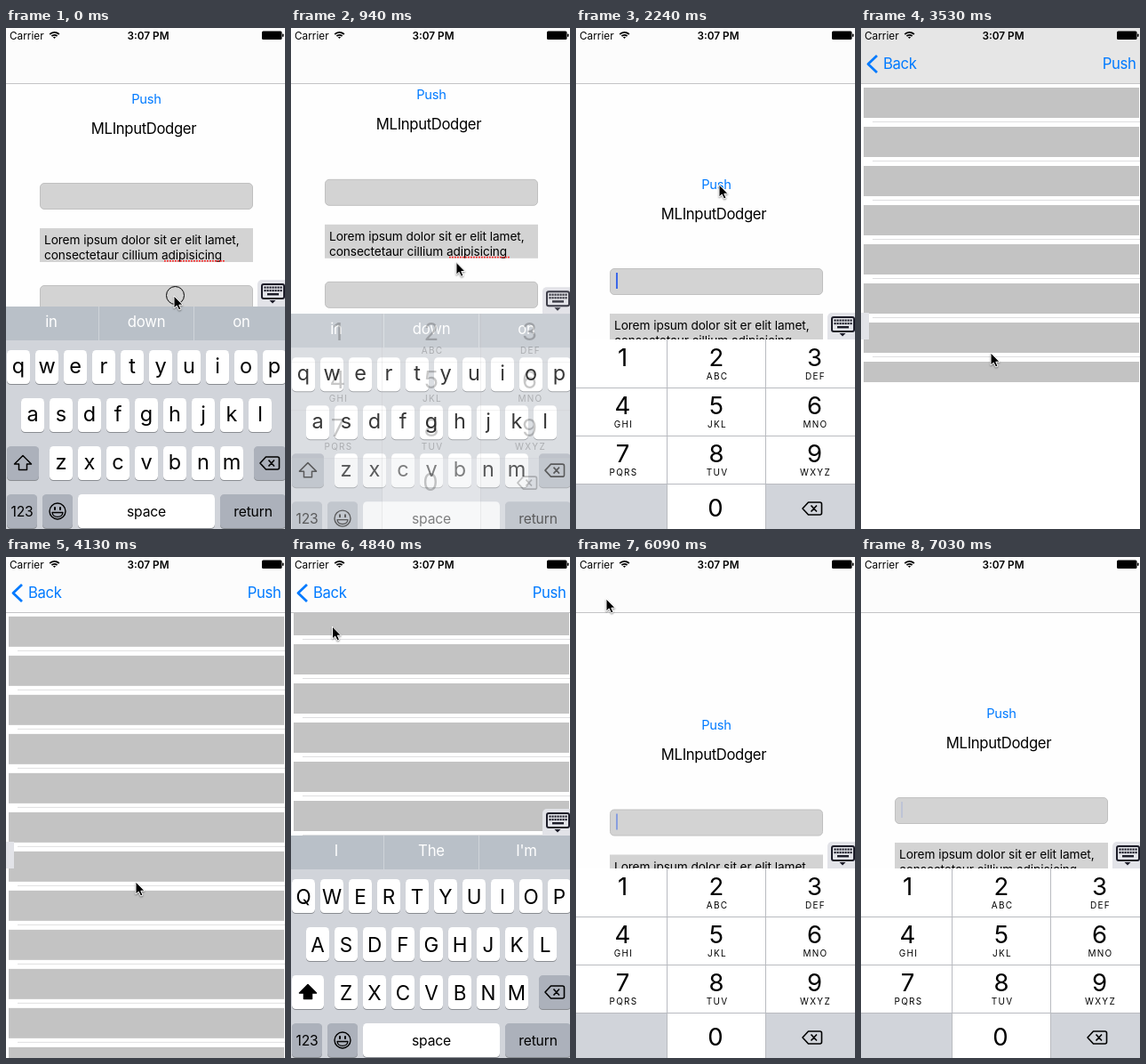
Animation of 314x563 px, one loop 7.26 s. Source, as an HTML page with a canvas:

```html
<!DOCTYPE html>
<html lang="en">
<head>
<meta charset="utf-8">
<title>Input dodging demo</title>
<style>
  html, body { margin: 0; width: 100%; height: 100%; overflow: hidden; background: #fff; }
  canvas { display: block; width: 314px; height: 563px; }
</style>
</head>
<body>
<canvas id="stage"></canvas>
<script>
const W = 314, H = 563, LOOP = 7260, LAST_CHANGE = 7030;
const BLUE = '#007aff', CARET = '#3b67e8', KEYBOARD = '#d1d4da';
const LETTERS_TOP = 313, NUMPAD_TOP = 350, ROW = 54, COLUMN = 32, CELL = 44;

// Starts of the main events, in ms.
const SWAP = 850, FOCUS_FIRST = 1640, PUSH = 2560, SETTLE = 3600, TYPE = 4120, POP = 5410, DODGE = 6140;
const TAPS = [-90, 1500, 2300, 3850, 5140];
const TAP_LENGTH = 120;

const canvas = document.getElementById('stage');
const ratio = window.devicePixelRatio || 1;
canvas.width = W * ratio;
canvas.height = H * ratio;
const ctx = canvas.getContext('2d');

const clamp = v => Math.min(1, Math.max(0, v));

// Eased progress from 0 to 1.
function ramp(t, start, length) {
  const p = clamp((t - start) / length);
  return p * p * (3 - 2 * p);
}

function rect(x, y, w, h, color) {
  ctx.fillStyle = color;
  ctx.fillRect(x, y, w, h);
}

function paint(fill, stroke, width) {
  if (fill) { ctx.fillStyle = fill; ctx.fill(); }
  if (stroke) { ctx.strokeStyle = stroke; ctx.lineWidth = width; ctx.stroke(); }
}

function rounded(x, y, w, h, r, fill, stroke, width = 1) {
  ctx.beginPath();
  ctx.roundRect(x, y, w, h, r);
  paint(fill, stroke, width);
}

function arc(x, y, r, from, to, fill, stroke, width = 1) {
  ctx.beginPath();
  ctx.arc(x, y, r, from * Math.PI, to * Math.PI);
  paint(fill, stroke, width);
}

function shape(path, fill, stroke, width = 1.5) {
  const outline = new Path2D(path);
  ctx.lineJoin = 'round';
  if (fill) { ctx.fillStyle = fill; ctx.fill(outline); }
  if (stroke) { ctx.strokeStyle = stroke; ctx.lineWidth = width; ctx.stroke(outline); }
}

function text(string, x, y, size, { color = '#000', align = 'center', spacing = 0, weight = 400 } = {}) {
  ctx.font = `${weight} ${size}px Inter, "Open Sans", sans-serif`;
  ctx.letterSpacing = spacing + 'px';
  ctx.textAlign = align;
  ctx.fillStyle = color;
  ctx.fillText(string, x, y);
}

function at(x, y, draw) {
  ctx.save();
  ctx.translate(x, y);
  draw();
  ctx.restore();
}

function caret(t, x, y, peak) {
  ctx.globalAlpha = clamp(.5 + 1.8 * Math.cos((t - peak) / 910 * 2 * Math.PI));
  rect(x, y, 2, 18, CARET);
}

function drawForm(t) {
  const rise = t < SETTLE
    ? 115 * ramp(t, FOCUS_FIRST, 360) - 19 * ramp(t, SWAP, 300)
    : 109.5 - 13.5 * ramp(t, DODGE, 310);
  rect(0, 0, W, H, '#fefefe');
  at(0, rise, () => {
    text('Push', 158, 84.5, 14.7, { color: BLUE, spacing: -.2 });
    text('MLInputDodger', 155, 118.5, 16.7, { spacing: -.35 });
    for (const y of [174.5, 289.5]) rounded(38.5, y, 239, 29, 4.5, '#d3d3d3', '#c0c0c0');
    rect(38, 225, 240, 38, '#d3d3d3');
    const body = { align: 'left', spacing: -.09 };
    text('Lorem ipsum dolor sit er elit lamet,', 43, 243, 13.7, body);
    text('consectetaur cillium adipisicing', 43, 260, 13.7, body);
    for (let x = 178; x < 245; x += 3) rect(x, 261, 1.8, 1.6, '#f22');
    if (t < SWAP) caret(t, 185, 229, 507);
    else if (t < FOCUS_FIRST) caret(t, 45, 294, 1235);
    else caret(t, 45, 179, 403);
  });
}

function drawTable(t) {
  const scroll = 57 * ramp(t, TYPE, 360);
  rect(0, 0, W, H, '#fff');
  for (let y = 67 - scroll; y < H; y += CELL) {
    rect(3, y, 310, 34, '#c3c3c3');
    rect(13, y + 38, W, 1, '#dedee0');
  }
  if (t < SETTLE) rect(0, 398, W, H, '#fff');
}

function drawBackspace(x, y) {
  at(x, y, () => shape('M-11 0L-4.5-7H8.5Q10.5-7 10.5-5V5Q10.5 7 8.5 7H-4.5ZM-1.5-3.5L5 3.5M5-3.5L-1.5 3.5', null, '#000', 1.6));
}

function drawDismiss() {
  rounded(283, -30, 40, 30, [5, 0, 0, 0], '#e2e3e8');
  rounded(288, -25, 25, 16, 2, null, '#1c1c28', 2);
  for (let i = 0; i < 14; i++)
    rect(290.5 + i % 7 * 3, i < 7 ? -22.5 : -19, 2.1, 2.2, '#1c1c28');
  rect(294, -15, 13, 2.4, '#1c1c28');
  at(300, -7, () => shape('M-3.5 0H3.5L0 3.5Z', '#1c1c28'));
}

function drawKey(x, y, w, dark) {
  rounded(x, y + 1, w, 38, 4.5, '#898c91');
  rounded(x, y, w, 38, 4.5, dark ? '#acb1bb' : '#fff');
}

function drawWordKey(word, x, w, dark) {
  drawKey(x, 211, w, dark);
  text(word, x + w / 2, 235.5, 15.7, { spacing: -.2 });
}

function drawSmile(x, y) {
  at(x, y, () => {
    arc(0, 0, 9, 0, 2, null, '#000', 1.4);
    shape('M-6 1.5H6C5 8 -5 8 -6 1.5Z', null, '#000', 1.3);
    for (const side of [-3, 3]) rounded(side - 1, -5, 2, 4, 1, '#000');
  });
}

function drawLetters(upper) {
  drawDismiss();
  rect(0, 0, W, 250, KEYBOARD);
  rect(0, 0, W, 38, '#b9c0c8');
  (upper ? ['I', 'The', 'I\'m'] : ['in', 'down', 'on']).forEach((word, i) => {
    text(word, 51 + i * 107, 23, 16.7, { color: '#fff', spacing: -.2 });
    if (i) rect(i * 107 - 3, 0, 1, 38, '#cfd4d9');
  });

  ['qwertyuiop', 'asdfghjkl', 'zxcvbnm'].forEach((letters, row) => {
    const left = 158 - (letters.length * COLUMN - 6) / 2;
    [...letters].forEach((letter, i) => {
      const x = left + i * COLUMN, y = 49 + row * ROW;
      drawKey(x, y, 26);
      text(upper ? letter.toUpperCase() : letter, x + 13, y + (upper ? 27.5 : 26), upper ? 22.5 : 23.5);
    });
  });

  drawKey(1, 157, 36, !upper);
  at(19, 176, () => shape('M0-8.5L9.5 1H4.5V7.5H-4.5V1H-9.5Z', upper && '#000', '#000'));
  drawKey(279, 157, 36, true);
  drawBackspace(297, 176);

  drawWordKey('123', 1, 34, true);
  drawWordKey('', 41, 34, true);
  drawSmile(58, 230);
  drawWordKey('space', 81, 154);
  drawWordKey('return', 241, 74, true);
}

function drawNumpad() {
  drawDismiss();
  rect(0, 0, W, 260, '#fff');
  rect(0, 3 * ROW, W, 100, KEYBOARD);
  rect(103, 3 * ROW, 110, 100, '#fff');
  ['', 'ABC', 'DEF', 'GHI', 'JKL', 'MNO', 'PQRS', 'TUV', 'WXYZ'].forEach((label, i) => {
    const x = 52.5 + i % 3 * 108 - (i % 3 === 1) * 2.5, y = Math.floor(i / 3) * ROW;
    text(i + 1, x, y + 29.5, 27.5);
    text(label, x + 1, y + 45, 10, { spacing: 1.3 });
  });
  text('0', 157, 199, 27.5);
  drawBackspace(266, 190);
  for (let i = 1; i <= 3; i++) rect(0, i * ROW, W, 1, '#b9bbc0');
  for (const x of [102, 213]) rect(x, 0, 1, 260, '#b9bbc0');
}

function drawKeyboards(t, page) {
  const swap = ramp(t, SWAP, 300);
  if (swap < 1) {
    at(0, LETTERS_TOP + (NUMPAD_TOP - LETTERS_TOP) * swap, () => {
      drawLetters(false);
      ctx.globalAlpha = swap;
      if (swap) drawNumpad();
    });
    return;
  }
  at(-W * page, NUMPAD_TOP, drawNumpad);
  if (t > TYPE) {
    const hidden = (1 - ramp(t, TYPE, 360)) * 282;
    at(W * (1 - page), LETTERS_TOP + hidden, () => drawLetters(true));
  }
}

function drawStatus() {
  text('Carrier', 4, 12.5, 11.8, { align: 'left' });
  text('3:07 PM', 160, 12.5, 11.8, { weight: 600 });
  for (let i = 0; i < 3; i++) arc(54.5, 12, 1.2 + i * 3, -.76, -.24, null, '#000', 1.8);
  rounded(288, 3.5, 22.5, 9.5, 1.5, '#000');
  rounded(311, 6.5, 1.5, 3.5, .7, '#000');
}

function drawBars(t, page) {
  const gray = 252 - 22 * (ramp(t, PUSH, 500) - ramp(t, SETTLE - 40, 60));
  rect(0, 0, W, 62, `rgb(${gray},${gray},${gray})`);
  rect(0, 62, W, 1, '#c4c4c6');
  at((1 - page) * 60, 0, () => {
    ctx.globalAlpha = page;
    shape('M18 31L8 40.5L18 50', null, BLUE, 2.8);
    text('Back', 25, 46, 16.7, { color: BLUE, align: 'left', spacing: -.35 });
    text('Push', 309.5, 46, 16.7, { color: BLUE, align: 'right', spacing: -.35 });
  });
  drawStatus();
}

// Each move is [start, length, x, y] and ends at that point.
function pointerAt(t) {
  const moves = [[700, 680, 178.5, 170], [1700, 440, 161, 176], [2880, 620, 146, 365],
    [4420, 420, 46.5, 78], [4850, 270, 31, 43], [POP, 190, 34, 47], [DODGE, 640, 150, 580]];
  let x = 189, y = 301;
  for (const [start, length, toX, toY] of moves) {
    const p = ramp(t, start, length);
    x += (toX - x) * p;
    y += (toY - y) * p;
  }
  return [x, y];
}

function drawPointer(t) {
  at(...pointerAt(t), () => {
    if (TAPS.some(start => t >= start && t < start + TAP_LENGTH))
      arc(1.5, -.5, 10, 0, 2, null, '#000');
    ctx.shadowColor = 'rgba(0,0,0,.35)';
    ctx.shadowBlur = 2;
    ctx.shadowOffsetY = 1;
    shape('M0 0V14L3.2 11L5.6 16L8 15L5.8 10.2H10Z', '#000', '#fff', 1);
  });
}

function draw(t) {
  const page = ramp(t, PUSH, 500) - ramp(t, POP, 470);
  ctx.setTransform(ratio, 0, 0, ratio, 0, 0);
  at(-W * .3 * page, 0, () => drawForm(t));
  rect(0, 0, W, H, `rgba(0,0,0,${.1 * page})`);
  at(W * (1 - page), 0, () => drawTable(t));
  drawKeyboards(t, page);
  drawBars(t, page);
  drawPointer(t);
}

const began = performance.now();
function tick() {
  draw(Math.min((performance.now() - began) % LOOP, LAST_CHANGE));
  requestAnimationFrame(tick);
}
tick();
</script>
</body>
</html>
```
